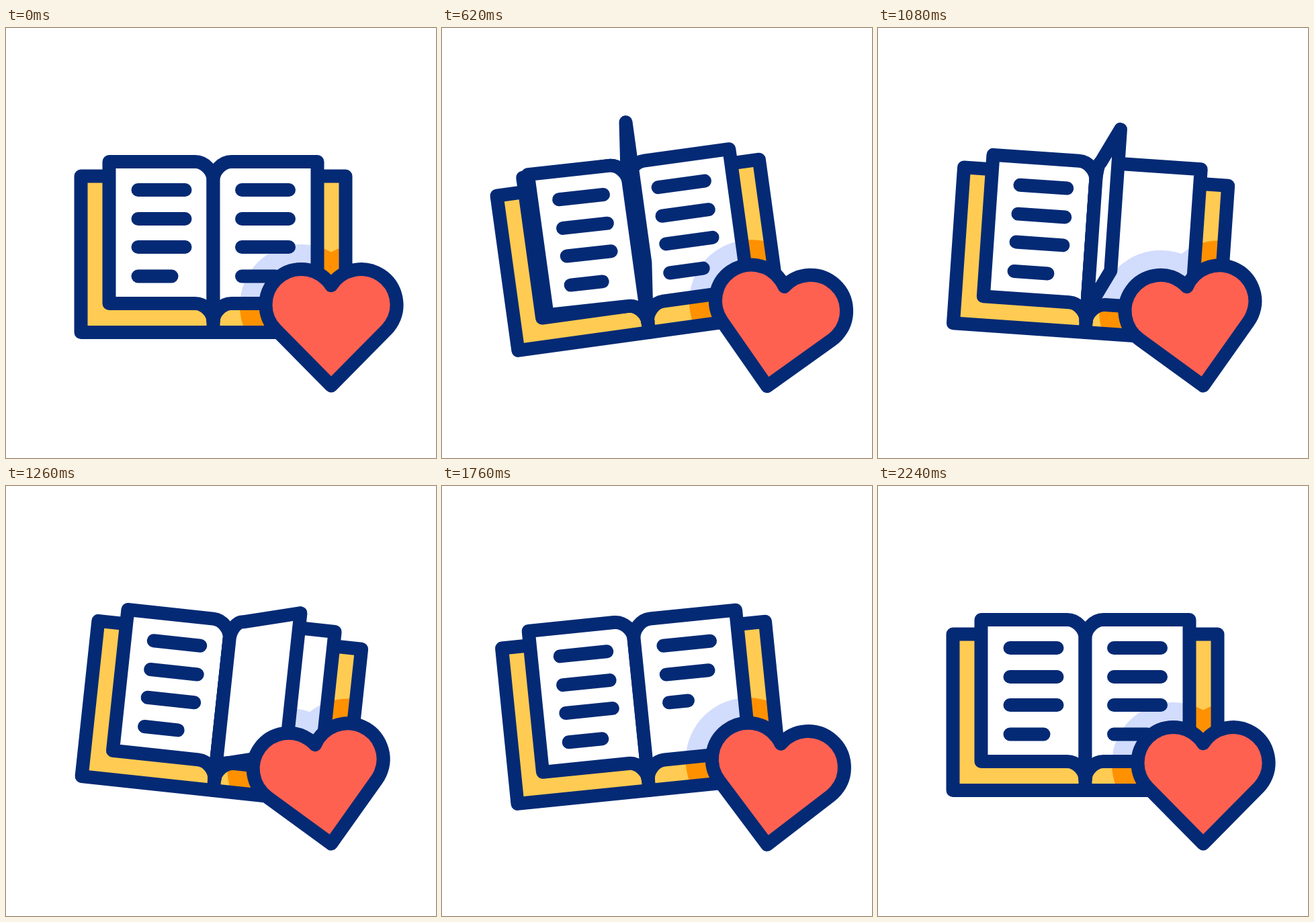
An HTML page with a canvas that plays this animation: 640x640 px, repeating every 2400 ms.

```html
<!DOCTYPE html>
<html lang="en">
<head>
<meta charset="utf-8">
<title>Favourite book</title>
<style>
  html, body { margin: 0; width: 100%; height: 100%; overflow: hidden; background: #fff; }
  canvas { display: block; width: 640px; height: 640px; }
</style>
</head>
<body>
<canvas id="stage" width="640" height="640"></canvas>
<script>
const ctx = document.getElementById('stage').getContext('2d');
const NAVY = '#042a75', YELLOW = '#ffcb52', ORANGE = '#ff9100', RED = '#ff6151', LILAC = '#d2dcfd';
const LOOP = 2400, STROKE = 20, RAD = Math.PI / 180;

// Book coordinates are relative to the foot of the spine.
const SPINE = { x: 308.5, y: 453 };
const PAGE = { width: 155, top: -254, bottom: -43, curve: 27, lift: 64 };
const LINE_Y = [-212, -169, -127, -83.5];
const LEFT_LINES = { from: -112, length: 70 };
const RIGHT_LINES = { from: 42.5, length: 70 };

// Heart coordinates are relative to its tip.
const TIP = { x: 484, y: 532.5 };
const HEART = { dx: 44.5, dy: -120.5, r: 53, middle: -87 };
const HALO = { width: 77, drop: 1.5 };

const BOOK_TILT = [[200, 0], [800, -10], [1180, 6.8], [1750, -5.8], [2240, 0]];
const HEART_TILT = [[200, 0], [660, 10], [770, 10], [1145, -11], [1760, 7.8], [2220, 0]];
const HEART_SCALE = [[200, 1], [400, 1.15], [595, 1], [790, 1.15], [985, 1],
  [1400, 1], [1600, 1.15], [1800, 1], [2000, 1.15], [2200, 1]];
const FLIP_STARTS = [200, 600], FLIP_HALF = 400;
const WRITE_START = 1200, WRITE_STEP = 200, WRITE_TIME = 400;

const clamp01 = v => Math.max(0, Math.min(1, v));
const smooth = v => v * v * (3 - 2 * v);

function keyed(keys, t) {
  if (t <= keys[0][0]) return keys[0][1];
  for (let i = 1; i < keys.length; i++) {
    const [t0, v0] = keys[i - 1], [t1, v1] = keys[i];
    if (t < t1) return v0 + (v1 - v0) * smooth((t - t0) / (t1 - t0));
  }
  return keys[keys.length - 1][1];
}

function paint(fill) {
  ctx.fillStyle = fill;
  ctx.fill();
  ctx.stroke();
}

function segment(x1, y1, x2, y2) {
  ctx.beginPath();
  ctx.moveTo(x1, y1);
  ctx.lineTo(x2, y2);
  ctx.stroke();
}

function coverPath() {
  ctx.beginPath();
  ctx.rect(-197, -232.5, 394, 232.5);
}

// side: -1 left, 1 right; open: 1 lying flat, 0 seen edge-on.
function pagePath(side, open) {
  const { width, top, bottom, curve, lift } = PAGE;
  const edge = side * width * open, join = side * curve * open;
  const up = lift * (1 - open), k = 0.448;
  ctx.beginPath();
  ctx.moveTo(edge, top - up);
  ctx.lineTo(join, top);
  ctx.bezierCurveTo(join * k, top, 0, top + curve * (1 - k), 0, top + curve);
  ctx.lineTo(0, bottom + curve);
  ctx.bezierCurveTo(0, bottom + curve * (1 - k), join * k, bottom, join, bottom);
  ctx.lineTo(edge, bottom - up);
  ctx.closePath();
}

function textLines({ from, length }, open, amount) {
  const rise = x => PAGE.lift * (1 - open) * (Math.abs(x) - PAGE.curve) / (PAGE.width - PAGE.curve);
  LINE_Y.forEach((y, i) => {
    const part = amount(i);
    if (part <= 0) return;
    const end = from + (i === 3 ? length - 20 : length) * part;
    segment(from * open, y - rise(from), end * open, y - rise(end));
  });
}

function heartPath() {
  const { dx, dy, r } = HEART, notch = Math.acos(dx / r);
  ctx.beginPath();
  ctx.moveTo(0, 0);
  ctx.arc(-dx, dy, r, Math.PI * 0.75, Math.PI * 2 - notch);
  ctx.arc(dx, dy, r, Math.PI + notch, Math.PI * 2.25);
  ctx.closePath();
}

function toBook(t) {
  ctx.setTransform(1, 0, 0, 1, SPINE.x, SPINE.y);
  ctx.rotate(keyed(BOOK_TILT, t) * RAD);
}

function toHeart(t) {
  const scale = keyed(HEART_SCALE, t);
  ctx.setTransform(1, 0, 0, 1, TIP.x, TIP.y);
  ctx.rotate(keyed(HEART_TILT, t) * RAD);
  ctx.translate(0, HEART.middle * (1 - scale));
  ctx.scale(scale, scale);
  return scale;
}

// Casts the heart's halo inside the current path.
function halo(t, color) {
  ctx.save();
  ctx.clip();
  toHeart(t);
  ctx.translate(0, HALO.drop);
  heartPath();
  ctx.lineWidth = HALO.width;
  ctx.strokeStyle = color;
  paint(color);
  ctx.restore();
}

function shadedShape(t, path, fill, shade) {
  path();
  ctx.fillStyle = fill;
  ctx.fill();
  halo(t, shade);
  path();
  ctx.stroke();
}

function drawBook(t) {
  toBook(t);
  ctx.lineWidth = STROKE;
  shadedShape(t, coverPath, YELLOW, ORANGE);
  segment(0, PAGE.top + PAGE.curve, 0, 0);

  pagePath(-1, 1);
  paint('#fff');
  textLines(LEFT_LINES, 1, () => 1);

  shadedShape(t, () => pagePath(1, 1), '#fff', LILAC);
  const firstLanding = FLIP_STARTS[0] + 2 * FLIP_HALF;
  textLines(RIGHT_LINES, 1, i => t < firstLanding ? 1
    : clamp01((t - WRITE_START - i * WRITE_STEP) / WRITE_TIME));

  for (const start of FLIP_STARTS) {
    const turn = (t - start) / FLIP_HALF - 1;
    if (turn < -1 || turn >= 1) continue;
    const open = Math.abs(turn);
    pagePath(turn < 0 ? -1 : 1, open);
    paint('#fff');
    if (turn < 0) textLines(LEFT_LINES, open, () => 1);
  }
}

function drawHeart(t) {
  const scale = toHeart(t);
  heartPath();
  ctx.lineWidth = STROKE / scale;
  paint(RED);
}

function frame(now) {
  const t = now % LOOP;
  ctx.setTransform(1, 0, 0, 1, 0, 0);
  ctx.fillStyle = '#fff';
  ctx.fillRect(0, 0, 640, 640);
  ctx.strokeStyle = NAVY;
  ctx.lineCap = ctx.lineJoin = 'round';
  drawBook(t);
  drawHeart(t);
}

const begun = performance.now();
function tick() {
  frame(performance.now() - begun);
  requestAnimationFrame(tick);
}
tick();
</script>
</body>
</html>
```
